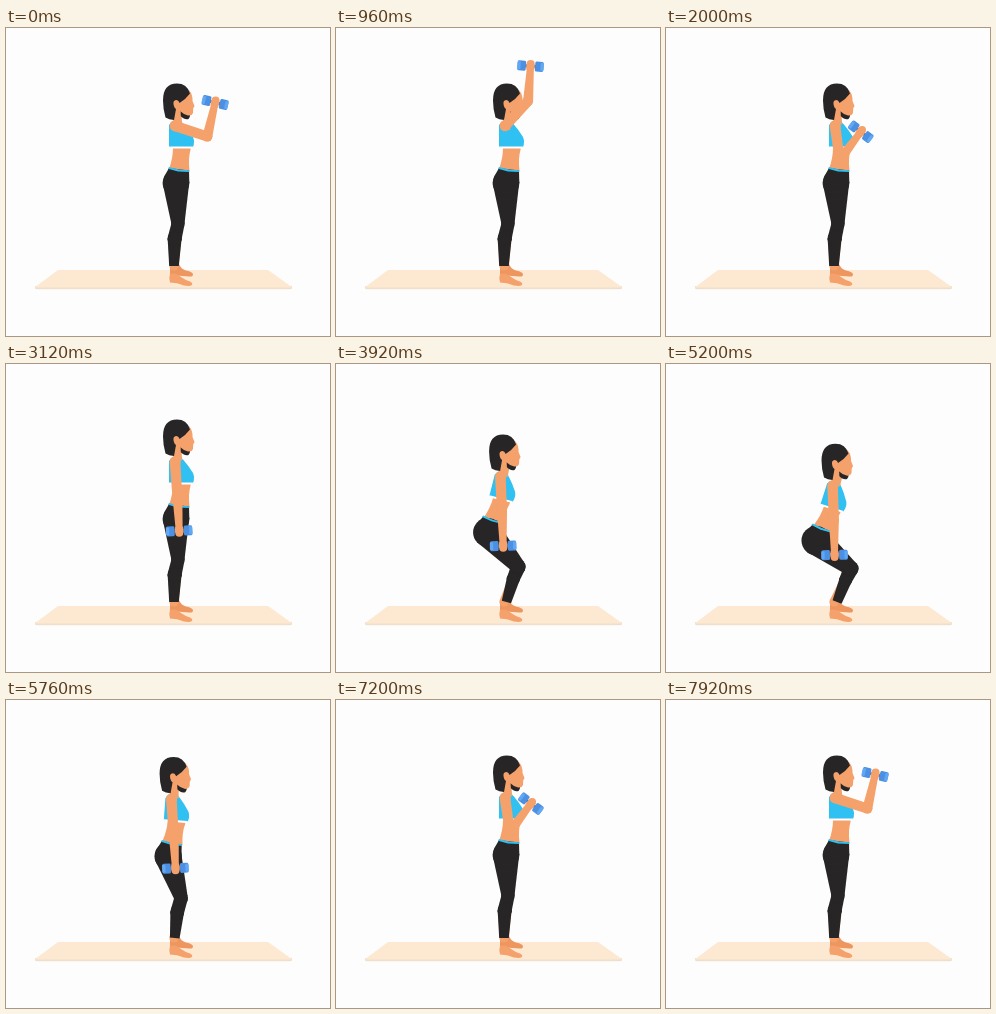
An HTML page with a canvas for the animation above (8000 ms loop, 324x308 px).

```html
<!DOCTYPE html>
<html lang="en">
<head>
<meta charset="utf-8">
<title>Squat, curl and press</title>
<style>
html, body { margin: 0; width: 100%; height: 100%; overflow: hidden; background: #fdfdfd; }
canvas { display: block; width: 324px; height: 308px; }
</style>
</head>
<body>
<canvas id="stage"></canvas>
<script>
const LOOP = 8000, STEP = 80, CYCLE = 7920;
const SKIN = '#f4a16c', SKIN_DARK = '#ee965f', BLACK = '#272526', CYAN = '#30c0f1';
const canvas = document.getElementById('stage');
const ctx = canvas.getContext('2d');
const scale = window.devicePixelRatio || 1;
canvas.width = 324 * scale;
canvas.height = 308 * scale;

const rad = deg => deg * Math.PI / 180;
const lerp = (a, b, k) => a + (b - a) * k;
const mix = (a, b, k) => [lerp(a[0], b[0], k), lerp(a[1], b[1], k)];

// Eased 0..1 progress between two times
function ease(t, start, end) {
  const k = Math.min(1, Math.max(0, (t - start) / (end - start)));
  return (1 - Math.cos(Math.PI * k)) / 2;
}

function shape(color, d) {
  ctx.fillStyle = color;
  ctx.fill(new Path2D(d));
}

function disc([x, y], r, color) {
  ctx.fillStyle = color;
  ctx.beginPath();
  ctx.arc(x, y, r, 0, 2 * Math.PI);
  ctx.fill();
}

function polygon(points, color) {
  ctx.fillStyle = color;
  ctx.beginPath();
  points.forEach(p => ctx.lineTo(...p));
  ctx.fill();
}

// Tapered limb with an optional round far end
function limb(a, b, ra, rb, color, roundEnd = true) {
  const dx = b[0] - a[0], dy = b[1] - a[1], len = Math.hypot(dx, dy);
  const nx = -dy / len, ny = dx / len;
  polygon([
    [a[0] + nx * ra, a[1] + ny * ra], [b[0] + nx * rb, b[1] + ny * rb],
    [b[0] - nx * rb, b[1] - ny * rb], [a[0] - nx * ra, a[1] - ny * ra]
  ], color);
  disc(a, ra, color);
  if (roundEnd) disc(b, rb, color);
}

// Angles are measured forward from straight down
const reach = ([x, y], angle, len) =>
  [x + Math.sin(rad(angle)) * len, y + Math.cos(rad(angle)) * len];

function pose(t) {
  const squat = t < 4580 ? ease(t, 3210, 4560) : 1 - ease(t, 4600, 6180);
  const curl = t < 4580 ? 1 - ease(t, 2030, 2880) : ease(t, 6400, 7160);
  const press = t < 4580
    ? (t < 800 ? ease(t + CYCLE, 7160, CYCLE + 800) : 1 - ease(t, 840, 1960))
    : ease(t, 7160, CYCLE + 800);
  const swing = 4 * squat * squat;
  return {
    squat,
    hip: [170 - 54 * squat + 36.5 * squat * squat, 155 + 46 * squat * squat],
    lean: 26 * squat,
    upperArm: lerp(4, 8, curl) + 133 * press - swing,
    forearm: lerp(3, 143, curl) + 33 * (1 - (1 - press) ** 2) - swing
  };
}

// Places a point of the upright body at the hip, turned by an angle
function atHip(hip, angle, x, y) {
  const c = Math.cos(rad(angle)), s = Math.sin(rad(angle));
  const dx = x - 170, dy = y - 155;
  return [hip[0] + dx * c - dy * s, hip[1] + dx * s + dy * c];
}

function drawMat() {
  shape('#eedfcb', 'M29 258H286V260Q286 261.3 284 261.3H31Q29 261.3 29 260Z');
  shape('#fde9d1', 'M52 242H262L286.5 259.5H28.5Z');
}

function drawFeet() {
  shape(SKIN_DARK, 'M164 236H173Q175 241 180 242.5Q187 244 187 246.5Q187 249 183 248.5L164 247Z');
  shape(SKIN, 'M164 246Q170 244 175 249Q179 252 184 253.5Q187 255 186 257Q184 258.5 178 257.5Q171 254.5 164 254.5Q162.5 250 164 246Z');
}

function drawLegs({ hip, lean, squat }) {
  const ankle = [168, 238], cuff = [168 + 4.5 * squat, 238];
  const knee = mix([172, 196], [191, 208.5], squat);
  const calf = mix(knee, cuff, 0.35);
  const kneeSize = 6.5 + 1.5 * squat, calfSize = 7 - squat;
  calf[0] -= 2 * (1 - squat);
  limb(knee, ankle, 5, 4.6, SKIN);
  limb(knee, calf, kneeSize, calfSize, BLACK);
  limb(calf, cuff, calfSize, 4.8, BLACK, false);
  limb(hip, knee, 13.3 + 2 * squat, kneeSize, BLACK);

  const onPelvis = p => atHip(hip, 0.7 * lean, ...p);
  polygon([[163, 140], [183, 142.5], [183.3, 155], [170, 162], [156.7, 155], [158.5, 148]]
    .map(onPelvis), BLACK);
  polygon([[163, 139], [173, 141.5], [183.3, 142.3], [183.3, 144], [172, 143.4], [162, 140.8]]
    .map(onPelvis), CYAN);
}

function drawTorso({ hip, lean }) {
  ctx.save();
  ctx.translate(...hip);
  ctx.rotate(rad(lean));
  ctx.translate(-170, -155);
  shape(SKIN, 'M169 86H175.5L176 95Q182 101 185 112L184.5 122Q182 130 183.5 143L163 141Q167 130 167 120L163.5 112V98Q164 93 169 92Z');
  shape(CYAN, 'M163 97Q165 95 167 96L169 102H174L175 95L177 95.5Q182 101 187 109Q189 114 187 119H163Z');
  shape('#d3ab88', 'M163.5 97Q164 93.5 169 92H174.5L177 95.5L174 97Z');
  shape('#fff', 'M163 118.5H187L186 120.5H164Z');
  ctx.restore();
}

function drawHead({ hip, lean }) {
  const [x, y] = atHip(hip, lean, 169, 95);
  ctx.save();
  ctx.translate(x - 169, y - 95);
  shape(BLACK, 'M174 82H183Q185.5 88 182.5 91Q178 92 174 87.5Z');
  shape(SKIN, 'M167 78H174.5L175 95H167.5Z');
  shape(SKIN, 'M167 70L183 62Q187 67 186.5 73L188.5 78L187.2 80.5L187 85Q186 88 182 87.5Q177 86 174 83L167 80Z');
  shape(BLACK, 'M157 72.5Q157 55.6 171 55.6Q181 55.6 184 65.5Q180 71 173.5 75Q172.5 72 170 72Q167 72.5 167.5 76Q168 80 170 81L168 92Q163 91.5 159.5 89.5Q157 81 157 72.5Z');
  ctx.restore();
}

function drawDumbbell([x, y], angle) {
  ctx.save();
  ctx.translate(x, y);
  ctx.rotate(rad(angle));
  ctx.fillStyle = '#3569b3';
  ctx.fillRect(-9, -1.5, 18, 3);
  for (const side of [-1, 1]) {
    ctx.fillStyle = '#4b90e2';
    ctx.beginPath();
    ctx.roundRect(side * 8.8 - 4.2, -5, 8.4, 10, 1.5);
    ctx.fill();
    ctx.fillStyle = '#62a7f2';
    ctx.beginPath();
    ctx.roundRect(side * 11.6 - 1.7, -4, 3.4, 8, 1.2);
    ctx.fill();
  }
  ctx.restore();
}

function drawArm({ hip, lean, upperArm, forearm }) {
  const shoulder = atHip(hip, lean, 169, 98);
  const elbow = reach(shoulder, upperArm, 34);
  const hand = reach(elbow, forearm, 35);
  limb(shoulder, elbow, 5.3, 5, SKIN);
  limb(elbow, hand, 5, 3.4, SKIN);
  drawDumbbell(hand, (forearm > 90 ? 180 : 0) - forearm);
  limb(reach(hand, forearm, -2), reach(hand, forearm, 2), 4.2, 4, SKIN);
}

function draw() {
  // Motion runs in 80 ms steps; the last step rests on the opening pose
  const t = Math.floor(performance.now() % LOOP / STEP) * STEP % CYCLE;
  const body = pose(t);
  ctx.setTransform(scale, 0, 0, scale, 0, 0);
  ctx.fillStyle = '#fdfdfd';
  ctx.fillRect(0, 0, 324, 308);
  drawMat();
  drawFeet();
  drawTorso(body);
  drawLegs(body);
  drawHead(body);
  drawArm(body);
  requestAnimationFrame(draw);
}

draw();
</script>
</body>
</html>
```
